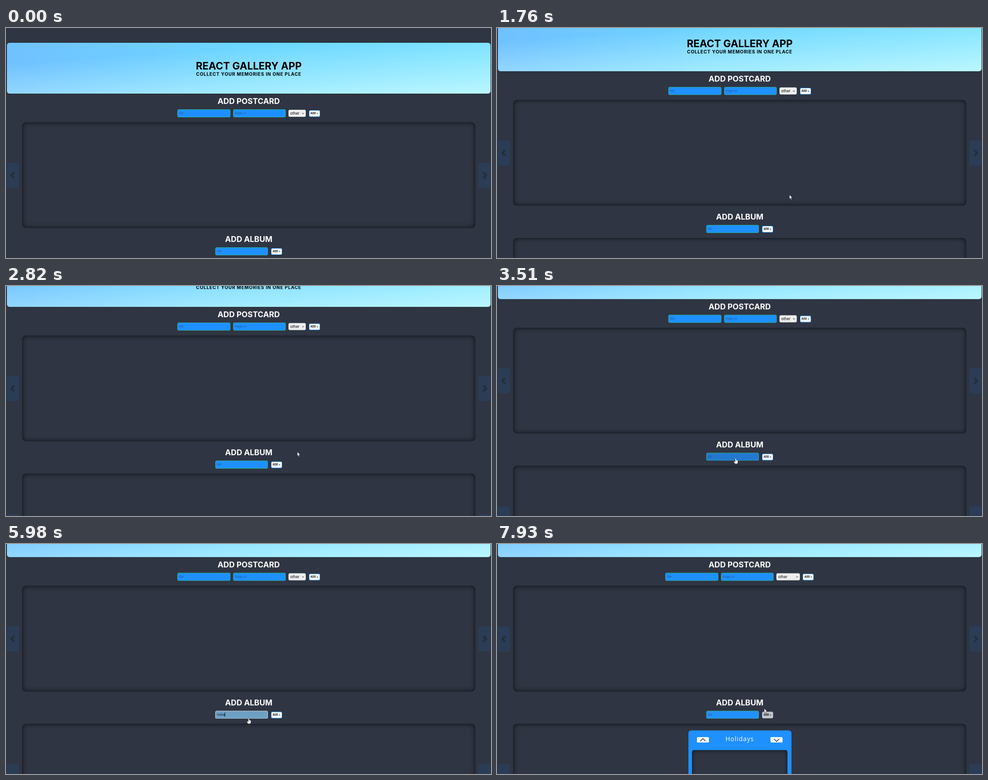
These frames come from a looping animation (1087x515 px, 7990 ms). An HTML page:

```html
<!DOCTYPE html>
<html lang="en">
<head>
<meta charset="utf-8">
<title>Gallery</title>
<style>
  html, body { margin: 0; width: 100%; height: 100%; overflow: hidden; background: #2f3542; }
  body { position: relative; font-family: Inter, "Open Sans", sans-serif; }
  div, svg { box-sizing: border-box; }
  #page, header, .line, .form, .panel, .nav, #card, #card div, .tip { position: absolute; }
  #page { left: 0; top: 0; width: 1087px; height: 800px; will-change: transform; }
  header { left: 1px; top: 32px; width: 1086px; height: 116px; box-sizing: border-box;
    border: 1px solid #1d232d; border-radius: 7px;
    background:
      linear-gradient(176deg, rgba(212,255,255,0) 25%, rgba(212,255,255,.34) 60%, rgba(212,255,255,.75)),
      linear-gradient(90deg, #70c1ff, #6ed6ff 48%, #70deff); }
  .line { left: 0; width: 1088px; height: 30px; line-height: 30px; text-align: center;
    font-weight: 700; white-space: nowrap; color: #fff; font-size: 17.5px; }
  .name { top: 69.5px; font-size: 22.7px; color: #000; }
  .motto { top: 88.3px; font-size: 10.2px; letter-spacing: .77px; color: #000; }
  .form { left: 0; width: 1087.5px; height: 18px; display: flex; justify-content: center;
    align-items: center; gap: 6px; }
  .field, .pick, .add { position: relative; flex: none; white-space: pre; }
  .field { width: 118.5px; height: 17.3px; line-height: 16px; padding-left: 3px; font-size: 5.9px;
    border: 1px solid #2bab8e; border-radius: 3px; background: #1e90ff; color: #24578f; }
  .pick { width: 39px; height: 15.5px; line-height: 14.5px; padding-left: 3px; font-size: 8.4px;
    border: 1px solid #d5d5d5; border-radius: 3px; background: #efefef; color: #000; }
  .pick svg { position: absolute; right: 3px; top: 5px; }
  .add { width: 25px; height: 15px; margin-left: .5px; line-height: 13px; text-align: center;
    font-size: 5.6px; font-weight: 700; border: 1px solid #1e90ff; border-radius: 3px;
    background: #fff; color: #000; }
  .panel { left: 36px; width: 1016px; height: 237px; border-radius: 9px;
    box-shadow: inset 0 0 11px #0c0f15; }
  .nav { width: 27px; height: 55.5px; background: #2b3d56; }
  .left { left: 2px; }
  .right { left: 1058.7px; transform: scaleX(-1); }
  #card { left: 429px; top: 534.6px; width: 230.5px; height: 240px; border-radius: 6px; background: #1e90ff; }
  #card .title { left: 0; top: 7px; width: 230px; text-align: center; color: #fff;
    font: 400 14px/24px "Open Sans", sans-serif; letter-spacing: 1px; }
  #card .step { top: 15.2px; width: 27px; height: 12.5px; border-radius: 2px; background: #fff; }
  #card .step svg { display: block; }
  #card .inner { left: 8px; top: 44px; width: 214px; height: 190px; border-radius: 5px;
    background: #2f3542; box-shadow: inset 0 0 8px #0c0f15; }
  .tip { left: 0; top: 0; overflow: visible; fill: #fff; stroke: #1b1f28; stroke-width: .5; }
</style>
</head>
<body>
<div id="page">
  <header></header>
  <div class="line name">REACT GALLERY APP</div>
  <div class="line motto">COLLECT YOUR MEMORIES IN ONE PLACE</div>

  <div class="line" style="top:148.7px">ADD POSTCARD</div>
  <div class="form" style="top:182px">
    <div class="field">title</div>
    <div class="field">image url</div>
    <div class="pick" id="pick">other<svg width="5" height="5"><path d="M.5 1.2L2.5 3.4L4.5 1.2" fill="none" stroke="#111"/></svg></div>
    <div class="add">ADD +</div>
  </div>
  <div class="panel" style="top:211.3px"></div>

  <div class="line" style="top:457.7px">ADD ALBUM</div>
  <div class="form" style="top:491px">
    <div class="field" id="album"></div>
    <div class="add" id="add">ADD +</div>
  </div>
  <div class="panel" style="top:520.3px"></div>

  <div id="card">
    <div class="title">Holidays</div>
    <div class="step" style="left:19px"><svg width="27" height="12"><path d="M7.5 9L13.5 3.5L19.5 9" fill="none" stroke="#111" stroke-width="1.3"/></svg></div>
    <div class="step" style="left:183.5px"><svg width="27" height="12"><path d="M7.5 4L13.5 9.5L19.5 4" fill="none" stroke="#111" stroke-width="1.3"/></svg></div>
    <div class="inner"></div>
  </div>
</div>
<svg class="tip" id="arrow" width="8" height="12"><path d="M0 0V9L2 7.2L3.6 10.7L5 10L3.5 6.6H6.2Z"/></svg>
<svg class="tip" id="hand" width="8" height="12"><path d="M-1 1Q0 -.6 1 1V4.6L4 5.4Q5.4 6 5 8.6L3.9 13H-1.5L-4 9Q-4.4 7.2 -2.8 7.4L-1 8.6Z"/></svg>

<script>
const $ = id => document.getElementById(id);
const page = $("page"), album = $("album");
const LOOP = 7990, NOTCH = 58.8, ADDED = 7730;

for (const top of [302, 611]) {
  for (const side of ["left", "right"]) {
    page.insertAdjacentHTML("beforeend",
      `<svg class="nav ${side}" style="top:${top}px"><path fill="#272e3a" d="M13 21H18.5L13.7 27.7L18.5 34.5H13L7.3 27.7Z"/></svg>`);
  }
}

// Each key is [time, ...values]
const cursorKeys = [
  [510, 1067, 505], [1270, 660, 373.5], [1480, 655.5, 373.5], [2680, 655.5, 373.5],
  [2820, 653, 371.5], [3440, 536, 383], [3510, 535, 385], [3650, 535, 385],
  [4310, 544, 389.5], [6900, 544, 389.5], [7560, 599, 368.5]
];
const blue = [30, 144, 255], hover = [36, 120, 208], focus = [110, 160, 196];
const fieldKeys = [
  [3150, ...blue], [3440, ...hover], [3650, ...hover],
  [4150, ...focus], [7590, ...focus], [8000, ...blue]
];
const addKeys = [[7300, 255, 255, 255], [7500, 196, 201, 207]];
const typed = [4710, 5370, 5570, 5770, 5850, 5980, 6110, 6240];

const clamp = u => Math.min(1, Math.max(0, u));
const smooth = u => u * u * (3 - 2 * u);

function tween(keys, t) {
  let i = 0;
  while (i < keys.length - 2 && t >= keys[i + 1][0]) i++;
  const [t0, ...a] = keys[i], [t1, ...b] = keys[i + 1];
  const u = smooth(clamp((t - t0) / (t1 - t0)));
  return a.map((v, k) => v + (b[k] - v) * u);
}

function wheel(t, start) {
  const u = clamp((t - start) / 400);
  return NOTCH * (1 - (1 - u ** 1.5) ** 7.5);
}

const rgb = c => `rgb(${c.map(Math.round)})`;

function draw(t) {
  const scroll = wheel(t, 1613) + wheel(t, 2708);
  page.style.transform = `translateY(${-scroll}px)`;

  const added = t >= ADDED;
  $("card").style.display = added ? "block" : "none";
  $("pick").style.width = added ? "52.5px" : "39px";

  const count = added ? 0 : typed.filter(at => t >= at).length;
  const caret = count && t < 6420;
  album.textContent = count ? "Holidays".slice(0, count) : "title";
  if (caret) album.insertAdjacentHTML("beforeend",
    '<span style="border-left:.8px solid #000;padding:1px 0"></span>');
  album.style.color = count ? "#101820" : "";
  album.style.background = rgb(tween(fieldKeys, t));
  album.style.borderColor = t > 3700 && t < 7600 ? "#d0d4d8" : "";

  $("add").style.background = rgb(tween(addKeys, t));
  $("add").style.borderColor = t > 7400 ? "#a9b1ba" : "";

  const [x, y] = tween(cursorKeys, t);
  const overField = t > 2820 && x < 588;
  for (const id of ["arrow", "hand"]) {
    const tip = $(id).style;
    tip.display = t >= 510 && overField === (id === "hand") ? "block" : "none";
    tip.transform = `translate(${x}px, ${y}px)`;
  }
}

const begin = performance.now();
function tick() {
  draw((performance.now() - begin) % LOOP);
  requestAnimationFrame(tick);
}
tick();
</script>
</body>
</html>
```
